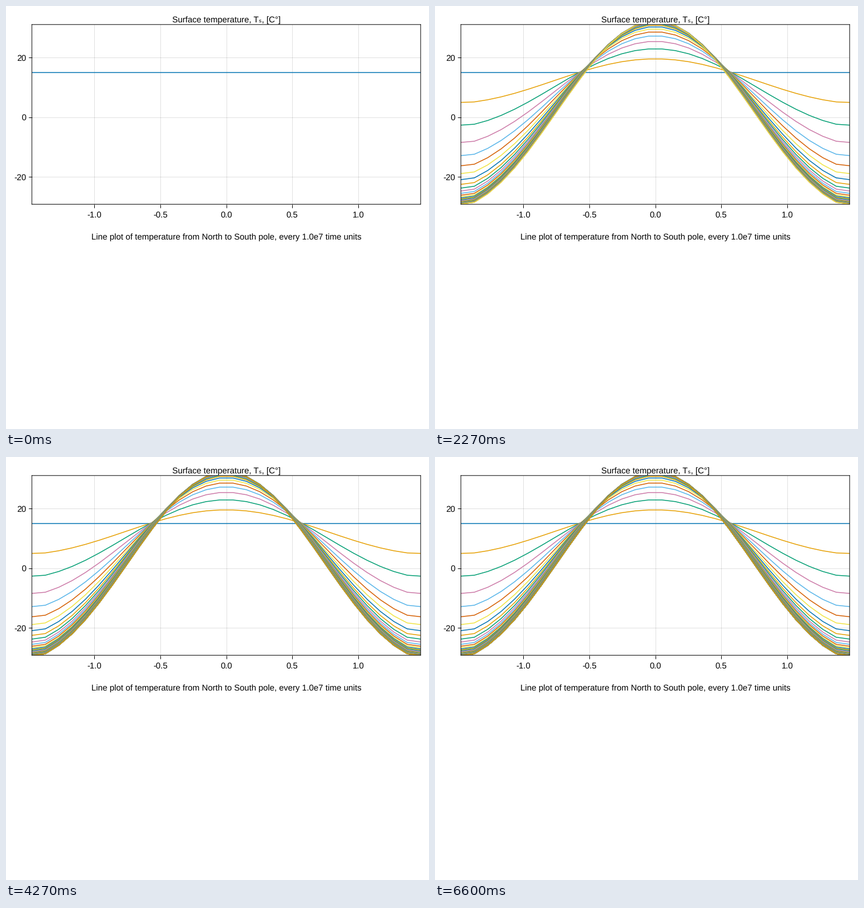
A matplotlib script that plays this animation: 748 px wide and 748 px high, repeating every 6.67 s.

```python
import numpy as np
import matplotlib.pyplot as plt
from matplotlib.animation import FuncAnimation
from matplotlib.collections import LineCollection

SIZE, DPI = 748, 100
PX = 72 / DPI  # points per pixel
STEPS = 100
TICK_MS, FRAMES = 23, 290
LEFT, RIGHT, TOP, BOTTOM = 45.8, 733.2, 32.8, 350.6
X_SCALE, Y_SCALE = 233.4, 5.28
X_ZERO, Y_ZERO = 389.5, 196.8
COLORS = ["#0072B2", "#E69F00", "#009E73", "#CC79A7",
          "#56B4E9", "#D55E00", "#F0E442"]

plt.rcParams.update({
    "font.family": ["Liberation Sans", "DejaVu Sans"],
    "font.size": 14.95 * PX,
    "text.hinting": "none",
    "path.simplify": False,
})

lat = np.linspace(-1.4726, 1.4726, 30)
shape = np.cos(lat) ** 2
shape[[0, -1]] = 0.027  # heat mixing flattens the poles
bend = np.sin(2 * lat) ** 2
bend[[0, -1]] = 0


def temperature(n):
    """Profile after n steps, relaxing at a fast and two slow rates."""
    if n == 0:
        return np.full_like(lat, 15.0)
    fast, slow = 0.742 ** n, 0.88 ** n
    pole = -29.2 + 34.2 * fast + 10 * slow
    equator = 32.1 - 18 * fast + 0.9 * slow
    span = (equator - pole) / (shape.max() - shape.min())
    cooling = 1.55 * (1 - 0.947 ** n)
    return pole + span * (shape - shape.min()) - cooling * bend


fig = plt.figure(figsize=(SIZE / DPI, SIZE / DPI), dpi=DPI, facecolor="white")


def label(x, y, text, ha="center"):
    fig.text(x / SIZE, 1 - y / SIZE, text, ha=ha, va="baseline", color="black")


ax = fig.add_axes([LEFT / SIZE, 1 - BOTTOM / SIZE,
                   (RIGHT - LEFT) / SIZE, (BOTTOM - TOP) / SIZE])
ax.set_xlim((LEFT - X_ZERO) / X_SCALE, (RIGHT - X_ZERO) / X_SCALE)
ax.set_ylim((Y_ZERO - BOTTOM) / Y_SCALE, (Y_ZERO - TOP) / Y_SCALE)
x_ticks = [-1.0, -0.5, 0.0, 0.5, 1.0]
y_ticks = [-20, 0, 20]
ax.set_xticks(x_ticks)
ax.set_yticks(y_ticks)
ax.tick_params(length=6 * PX, width=PX, labelbottom=False, labelleft=False)
ax.set_axisbelow(True)
ax.grid(color="black", alpha=0.12, linewidth=PX)
for spine in ax.spines.values():
    spine.set_linewidth(PX)
    spine.set_snap(False)
    spine.set_zorder(5)

for v in x_ticks:
    label(X_ZERO + v * X_SCALE, 373.5, f"{v:.1f}")
for v in y_ticks:
    label(35.5, Y_ZERO - v * Y_SCALE + 5.2, str(v), ha="right")
label(X_ZERO, 29, "Surface temperature, T\u209b, [C\u00b0]")
label(X_ZERO, 412.5,
      "Line plot of temperature from North to South pole, "
      "every 1.0e7 time units")

curves = [np.column_stack([lat, temperature(n)]) for n in range(STEPS)]
lines = LineCollection(curves[:1], colors=COLORS, linewidths=1.5 * PX,
                       snap=False, zorder=3)
ax.add_collection(lines, autolim=False)

# 15 steps per second, on a 10 ms clock
starts = 10 * np.round(np.arange(STEPS) * 20 / 3)


def update(frame):
    shown = np.searchsorted(starts, (frame + 1) * TICK_MS)
    lines.set_segments(curves[:shown])
    return [lines]


anim = FuncAnimation(fig, update, frames=FRAMES, interval=TICK_MS,
                     repeat=True, repeat_delay=0, blit=False)
plt.show()
```
